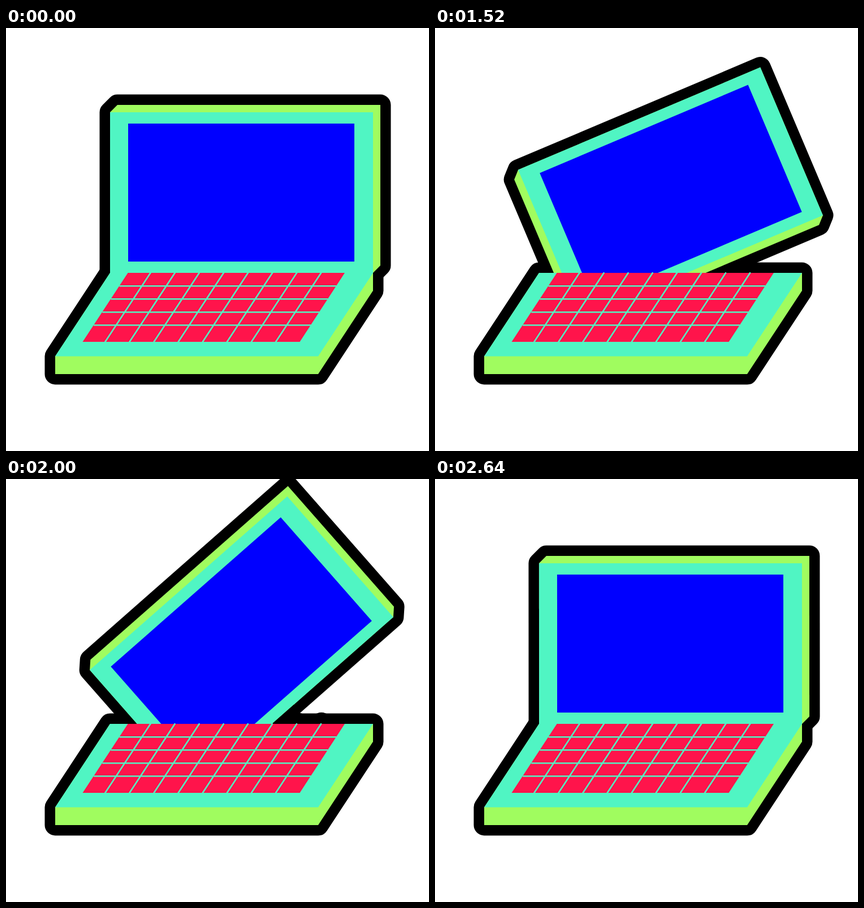
An HTML page for the animation above (3000 ms loop, 748 by 748 pixels).

```html
<!DOCTYPE html>
<html lang="en">
<head>
<meta charset="utf-8">
<title>Laptop with a spinning screen</title>
<style>
  html, body { margin: 0; width: 100%; height: 100%; overflow: hidden; background: #fff; }
  svg { display: block; width: 100%; height: 100%; }
  .outline { fill: #000; stroke: #000; stroke-width: 37; stroke-linejoin: round; }
  .teal { fill: #50f5c3; }
  .lime { fill: #a0fc5f; }
  .keys { fill: #ff144b; }
  .grid { fill: none; stroke: #50f5c3; stroke-width: 2.5; }
</style>
</head>
<body>
<svg viewBox="0 0 748 748">
  <path class="outline" d="M184 433H649V464.5L552 612H87V580.5Z"/>
  <g id="bumps"></g>
  <g id="screen">
    <path class="outline" d="M184 149L197 136H662V420L649 433H184Z"/>
    <path class="lime" d="M184 149L197 136H662V420L649 433H184Z"/>
    <path class="teal" d="M184 149H649V433H184Z"/>
    <path fill="#00f" d="M216 169H616V413H216Z"/>
  </g>
  <path class="lime" d="M184 433H649V464.5L552 612H87V580.5Z"/>
  <path class="teal" d="M184 433H649L552 580.5H87Z"/>
  <path class="keys" d="M215.5 433H599L519.5 555H135.5Z"/>
  <path class="grid" id="grid"/>
</svg>
<script>
  const LOOP = 3000, STEP = 40, START = 1078, DURATION = 1580;
  const $ = id => document.getElementById(id);

  // Key gaps: slanted columns and level rows
  let grid = '', bumps = '';
  for (let i = 0; i < 8; i++) {
    const x = 256 + 43.1 * i;
    grid += `M${x} 432.3L${x - 81} 555.5`;
    bumps += `<circle cx="${x}" cy="431.3" r="18.5"/>`;
  }
  for (let i = 0; i < 4; i++) {
    const y = 456.2 + 23.1 * i, x = 215.5 - (y - 433) * 0.652;
    grid += `M${x} ${y}h384`;
  }
  $('grid').setAttribute('d', grid);
  $('bumps').innerHTML = bumps;

  // Cubic Bezier easing (0.333, 0, 0.1454, 1), solved by bisection
  function ease(u) {
    if (u <= 0 || u >= 1) return u <= 0 ? 0 : 1;
    let lo = 0, hi = 1, s;
    for (let i = 0; i < 30; i++) {
      s = (lo + hi) / 2;
      const x = 3 * s * (1 - s) * ((1 - s) * 0.333 + s * 0.1454) + s ** 3;
      if (x < u) lo = s; else hi = s;
    }
    return s * s * (3 - 2 * s);
  }

  function draw() {
    const t = Math.floor(performance.now() % LOOP / STEP) * STEP;
    const angle = 360 * ease((t - START) / DURATION);
    $('screen').setAttribute('transform', `rotate(${angle} 416.5 291)`);
    requestAnimationFrame(draw);
  }
  draw();
</script>
</body>
</html>
```
